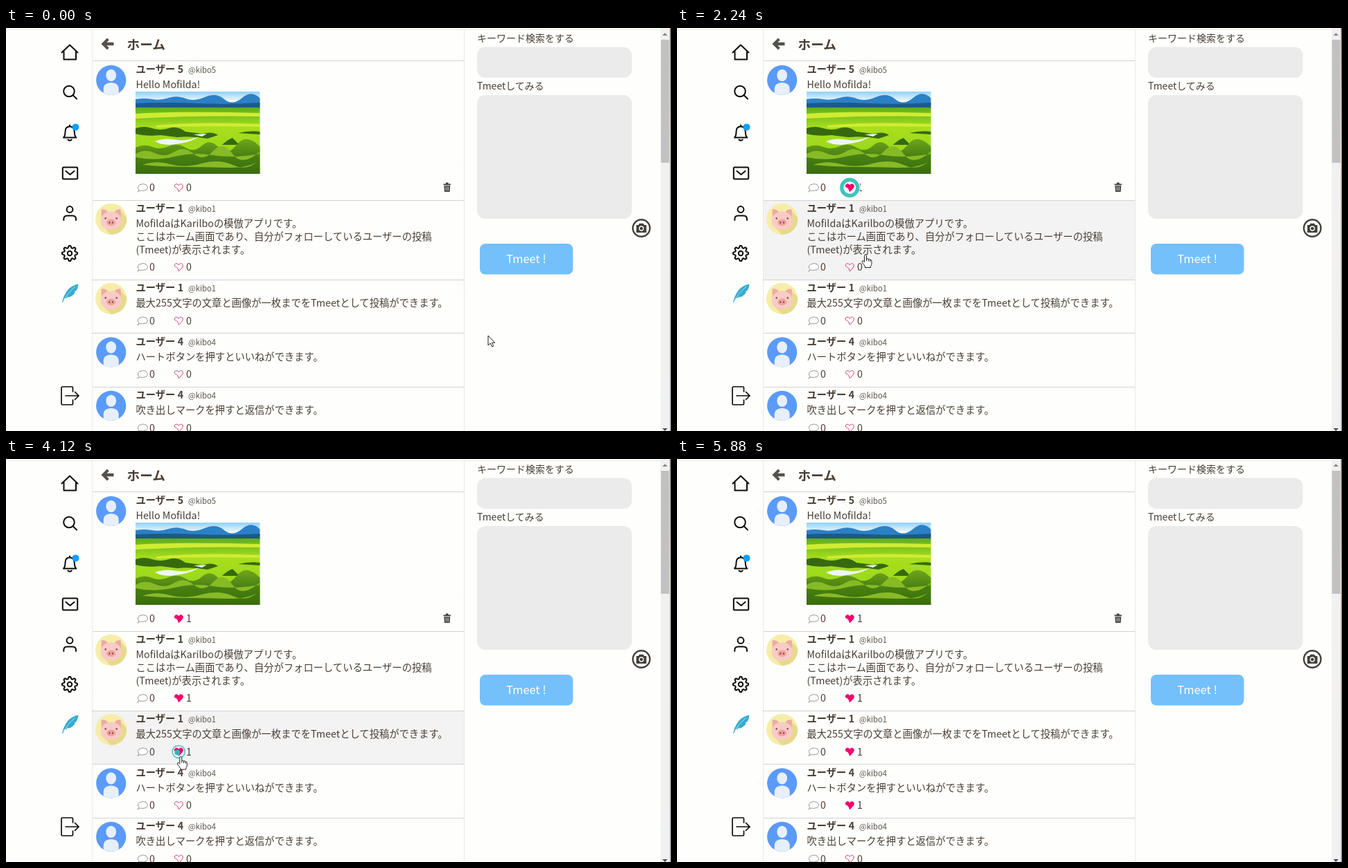
These frames come from a looping animation (960 px wide and 583 px high, 6 s). An HTML page:

```html
<!DOCTYPE html>
<html lang="ja">
<head>
<meta charset="utf-8">
<title>ホーム</title>
<style>
html, body { margin: 0; width: 100%; height: 100%; overflow: hidden; background: #fefefc; }
svg { display: block; width: 960px; height: 583px; }
text { font: 14.3px "Noto Sans CJK JP", "Noto Sans CJK", "Noto Sans", sans-serif; fill: #483e35; white-space: pre; }
.name { font-weight: 700; }
.handle { font-size: 11.3px; fill: #5d544b; }
.title { font-size: 18.7px; font-weight: 700; }
.label { font-size: 14px; }
.button { font-size: 16.5px; fill: #fff; text-anchor: middle; }
.icon { fill: none; stroke: #0b0b0b; stroke-width: 2; stroke-linejoin: round; stroke-linecap: round; }
</style>
</head>
<body>
<svg viewBox="0 0 960 583" xmlns="http://www.w3.org/2000/svg">
  <defs>
    <clipPath id="disc"><circle r="21.6"/></clipPath>
    <clipPath id="pigDisc"><circle r="22.6"/></clipPath>
    <clipPath id="frame"><rect width="179.5" height="119"/></clipPath>
    <linearGradient id="sky" x2="0" y2="1"><stop stop-color="#8fd0f7"/><stop offset="1" stop-color="#f1faff"/></linearGradient>
    <linearGradient id="field" x2="0" y2="1"><stop stop-color="#5fae1c"/><stop offset=".3" stop-color="#a8df1d"/><stop offset="1" stop-color="#8ed01a"/></linearGradient>
    <linearGradient id="scrub" x2="0" y2="1"><stop stop-color="#6fa51b"/><stop offset=".5" stop-color="#487f12"/><stop offset="1" stop-color="#386c0c"/></linearGradient>
    <linearGradient id="edge" x2="0" y2="1"><stop stop-color="#6d5a50"/><stop offset=".3" stop-color="#a08c7c"/><stop offset="1" stop-color="#8b94a0"/></linearGradient>

    <g id="person">
      <circle r="21.6" fill="#5a9af9"/>
      <g clip-path="url(#disc)" fill="#e7effb">
        <ellipse cy="-7" rx="7.4" ry="8.6"/>
        <path d="M-11 20V13C-11 7-7 3.5 0 3.5S11 7 11 13V20Q0 23-11 20Z"/>
      </g>
    </g>
    <g id="pig">
      <circle r="22.6" fill="#f6eda9"/>
      <path clip-path="url(#pigDisc)" fill="#e6da8c" d="M14-11L34 9V34H10L-10 12Z"/>
      <path fill="#efa9a6" d="M-14-2L-14-14Q-7-15-4-9ZM14-2L14-14Q7-15 4-9Z"/>
      <path fill="#f9cbc6" d="M0-11C9-11 15-5 15 3S9 15 0 15-15 11-15 3-9-11 0-11Z"/>
      <ellipse cy="5" rx="6.5" ry="4.8" fill="#f0a19f"/>
      <g fill="#87504f"><circle cx="-8" cy="-1" r="1.3"/><circle cx="8" cy="-1" r="1.3"/>
      <ellipse cx="-2.3" cy="5" rx="1" ry="1.7"/><ellipse cx="2.3" cy="5" rx="1" ry="1.7"/></g>
    </g>
    <path id="bubble" fill="#fefefe" stroke="#8c8c8c" stroke-width=".9" d="M-5 3.5Q-8-.2-5.8-2.4Q-5-5-2-4.6Q0-6.4 2.5-5Q6-5.4 6.4-2.4Q8.8-.4 6.6 1.8Q6 4.5 3 3.8Q.5 5.3-1.8 4Q-3.2 4.8-4.5 4.2L-7.2 6.2Z"/>
    <path id="heart" d="M0 5.8C-2-3-6 1-6-2.2C-6-4.4-4.5-5.3-3.2-5.3C-1.5-5.3-.5-4.2 0-3C.5-4.2 1.5-5.3 3.2-5.3C4.5-5.3 6-4.4 6-2.2C6 1 2 3.4 0 5.8Z"/>
    <g id="photo" clip-path="url(#frame)">
      <rect width="180" height="14" fill="url(#sky)"/>
      <path fill="#2c80c6" d="M0 11Q12 9 24 11T48 9T72 10T100 8T128 11T154 9T180 10V20H0Z"/>
      <path fill="#1c5a86" d="M0 17Q45 15 90 17T180 16V25H0Z"/>
      <rect y="23" width="180" height="97" fill="url(#field)"/>
      <path fill="#d0ec34" d="M0 32Q70 28 180 31V36Q90 34 0 39ZM30 49Q100 43 180 47V51Q90 49 30 52Z"/>
      <path fill="#36690f" d="M0 53Q12 49 24 53T48 53T72 58L96 61Q112 57 119 63L104 68Q80 64 60 66L36 63Q15 65 0 61ZM125 77Q132 70 140 67Q146 73 150 77ZM148 60Q165 56 180 58V62Z"/>
      <path fill="#eef6f4" d="M28 72Q42 66 61 70Q73 72 92 65Q80 73 64 75Q42 80 28 72ZM84 62L103 61 96 65Z"/>
      <path fill="url(#scrub)" d="M0 81Q12 75 24 80T48 79T72 81T96 78T120 81T146 77T180 80V120H0Z"/>
      <path fill="#86bb25" d="M0 90Q14 82 28 89T56 87T84 90T112 86T140 90T180 86L180 90Q140 97 112 92T56 94T0 95ZM10 106Q30 99 50 105T95 104T140 106T175 102Q160 111 130 110T70 109T10 106Z"/>
    </g>
  </defs>

  <rect width="960" height="583" fill="#fefefc"/>
  <g id="posts"></g>
  <path d="M0 2.5H945" stroke="#eeebe3"/>
  <path d="M124.5 3V583M661.5 3V583" stroke="#d5d5d5" stroke-dasharray="1 1"/>
  <path fill="#55514e" d="M137.5 23L146 14.5 148.8 17.2 145.4 20.8H155.5V25.2H145.4L148.8 28.8 146 31.5Z"/>
  <text class="title" x="174.5" y="31">ホーム</text>

  <g class="icon">
    <path d="M80.5 35.5L92 24.5 103.5 35.5M83.5 34V45.5H101V34"/>
    <circle cx="91" cy="91.5" r="7.8"/><path d="M96.7 97.2L102 102.5"/>
    <path d="M83 158.5Q85.5 156 85.5 150Q85.5 142.5 92 142.5T98.8 150Q98.8 156 101.3 158.5ZM89.5 161.5Q92 164 94.7 161.5M92 140.5V142"/>
    <rect x="81.8" y="201.5" width="21.4" height="17" rx="1.5"/><path d="M86.5 207L92.5 212 98.5 207"/>
    <circle cx="92" cy="262.5" r="4.4"/><path d="M83.3 278V276.5Q83.3 271.5 88.3 271.5H96Q101 271.5 101 276.5V278"/>
    <path id="gear"/><circle cx="92" cy="326" r="3.2"/>
    <path stroke-width="1.7" d="M96.5 526V520.5Q96.5 519 95 519H81.500Q80 519 80 520.500V543.500Q80 545 81.500 545H95Q96.500 545 96.500 543.500V538M86 532H105M99.500 526.500L105 532 99.500 537.500"/>
  </g>
  <circle cx="100.5" cy="143.400" r="5" fill="#11a0f4"/>
  <path fill="#37acd0" d="M81 397Q83 387 89 379Q95 372 104.500 370.500Q104 376 101.500 380L98.500 381.500 100 382.500Q96 388 91 389.500L88 389 88.500 390.500Q86 391 84.500 391L82 397Z"/>
  <path fill="none" stroke="#a6deec" d="M83 394Q89 383 100 374"/>

  <text class="label" x="680" y="19.500">キーワード検索をする</text>
  <rect x="680" y="27.500" width="223.500" height="44.500" rx="12" fill="#ebebeb"/>
  <text class="label" x="680" y="89">Tmeetしてみる</text>
  <rect x="680" y="97" width="223.500" height="179" rx="12" fill="#ebebeb"/>
  <rect x="684" y="312" width="134.500" height="44.500" rx="8" fill="#74c0fb"/>
  <text class="button" x="751" y="339.500">Tmeet !</text>
  <circle cx="917.200" cy="289.500" r="12.300" fill="#fefefc" stroke="#42403c" stroke-width="2.400"/>
  <path fill="#42403c" d="M910 285H913L914.500 282.800H920L921.500 285H924.500V296H910Z"/>
  <circle cx="917.200" cy="290" r="3" fill="#42403c" stroke="#fefefc" stroke-width="1.300"/>

  <rect x="945" width="13" height="583" fill="#f1f1f1"/>
  <rect x="945.500" y="17" width="12" height="178" fill="#c1c1c1"/>
  <path fill="#8a8a8a" d="M947.500 11L951.200 7 955 11Z"/>
  <path fill="#505050" d="M947.500 579L951.200 583 955 579Z"/>
  <rect x="958.500" width="1.500" height="583" fill="url(#edge)"/>

  <g id="cursor" fill="#fff" stroke="#222" stroke-linejoin="round">
    <path id="arrow" d="M0 0V14L3.300 11 5.600 16 7.800 15 5.600 10.300H9.800Z"/>
    <path id="hand" d="M-1.500 1.500Q-1.500 0 0 0T1.500 1.500V6Q3 4.800 4.200 6.400Q6 5.600 6.800 7.200Q9 7 9 9.500V13Q9 15 7.500 16.500V18.500H-.5V17Q-3 13.500-4.500 11Q-5.500 9-4 8.600Q-3 8.500-1.500 10.500ZM1.500 6V9M4.200 6.400V9.500M6.800 7.200V10"/>
  </g>
</svg>
<script>
const LOOP = 6000, STEP = 40, RING_MS = 560;
const byId = id => document.getElementById(id);

const posts = [
  { top: 48, end: 249, user: 5, lines: ['Hello Mofilda!'], liked: 1640, ring: 1960, shade: '#fafafa' },
  { top: 249, end: 364, user: 1, liked: 2800, ring: 3280,
    lines: ['MofildaはKarilboの模倣アプリです。', 'ここはホーム画面であり、自分がフォローしているユーザーの投稿', '(Tmeet)が表示されます。'] },
  { top: 364, end: 441.5, user: 1, lines: ['最大255文字の文章と画像が一枚までをTmeetとして投稿ができます。'], liked: 3760, ring: 4060 },
  { top: 441.5, end: 519, user: 4, lines: ['ハートボタンを押すといいねができます。'], liked: 4640, ring: 5320 },
  { top: 519, end: 596.5, user: 4, lines: ['吹き出しマークを押すと返信ができます。'], liked: Infinity, ring: Infinity }
];

// time, x, y of the pointer tip
const route = [
  [0, 696, 445], [360, 696, 445], [460, 655, 488], [560, 575, 506], [700, 480, 450],
  [840, 394, 383], [960, 365, 354], [1240, 290, 262], [1520, 250, 231], [1920, 250, 231],
  [2240, 272, 328], [2480, 262, 342], [2800, 251, 343], [3080, 251, 343], [3360, 265, 416],
  [3680, 251, 424], [4080, 251, 424], [4360, 260, 470], [4640, 251, 498], [5080, 251, 498],
  [5400, 264, 550], [5640, 272, 590], [6000, 272, 590]
];

function postMarkup({ top, end, user, lines }) {
  const row = end - 18;
  const avatar = user === 1 ? 'pig' : 'person';
  const text = lines.map((line, i) => `<text x="187.500" y="${top + 39.3 + i * 18.6}">${line}</text>`).join('');
  const extras = user === 5 ? `<use href="#photo" x="187" y="92"/>
    <path fill="#3f3b38" d="M631.500 225.500H634.500L635.500 223.500H638L639 225.500H642V227.200H631.500Z"/>
    <path fill="#3f3b38" d="M632.300 228.200H641.200L640.600 237H633Z"/>
    <path stroke="#fff" stroke-width=".7" d="M634.800 229.500V235.500M636.800 229.500V235.500M638.800 229.500V235.500"/>` : '';
  return `<g>
    <rect class="shade" x="125" y="${top}" width="536" height="${end - top}" fill="none"/>
    <path d="M124 ${Math.floor(top) + .5 - (top === 48 ? 1 : 0)}H661" stroke="#d2d2d2"/>
    <use href="#${avatar}" x="151.700" y="${top + 27.4}"/>
    <text class="name" x="187.500" y="${top + 17.3}">ユーザー 5</text>
    <text class="handle" x="263" y="${top + 17.3}">@kibo${user}</text>
    ${text}${extras}
    <use href="#bubble" x="197" y="${row}"/>
    <text x="207" y="${row + 5.3}">0</text>
    <text class="count" x="260" y="${row + 5.3}">0</text>
    <g transform="translate(249.300 ${row})">
      <circle class="halo" r="15.500" fill="#fff"/>
      <use class="heart" href="#heart" stroke-width="1"/>
      <circle class="dot" cx="-2" cy="1" fill="#2db9b4"/>
      <circle class="ring" fill="none" stroke="#3cc4bd"/>
    </g>
  </g>`.replace('ユーザー 5', `ユーザー ${user}`);
}

byId('posts').innerHTML = posts.map(postMarkup).join('');
posts.forEach((post, i) => {
  const group = byId('posts').children[i];
  for (const part of ['shade', 'count', 'halo', 'heart', 'dot', 'ring']) {
    post[part + 'El'] = group.querySelector('.' + part);
  }
});

// Eight-toothed cog outline
byId('gear').setAttribute('d', 'M' + Array.from({ length: 64 }, (_, i) => {
  const a = i * Math.PI / 32, r = 9.6 + 1.5 * Math.tanh(2.5 * Math.cos(8 * a));
  return `${(92 + r * Math.cos(a)).toFixed(2)} ${(326 + r * Math.sin(a)).toFixed(2)}`;
}).join('L') + 'Z');

function pointerAt(t) {
  const i = route.findIndex(stop => stop[0] > t);
  const [t0, x0, y0] = route[i - 1], [t1, x1, y1] = route[i];
  const k = (t - t0) / (t1 - t0);
  return [x0 + (x1 - x0) * k, y0 + (y1 - y0) * k];
}

function set(el, attrs) {
  for (const name in attrs) el.setAttribute(name, attrs[name]);
}

function drawRing(post, p) {
  const active = p >= 0 && p < 1;
  const fade = active ? Math.min(1, (1 - p) * 2.5) : 0;
  set(post.ringEl, { r: 9 + 10 * p * p, 'stroke-width': 5 * Math.sin(Math.PI * p) ** 1.3 + .3, opacity: fade });
  set(post.haloEl, { opacity: p > .25 ? fade : 0 });
  set(post.dotEl, { r: 3 + 8 * p, opacity: active && p < .3 ? 1 : 0 });
}

function render(t) {
  const [x, y] = pointerAt(t);
  const [hx, hy] = pointerAt(Math.max(0, t - STEP));
  const overFeed = x < 661;
  set(byId('cursor'), { transform: `translate(${x.toFixed(1)} ${y.toFixed(1)})` });
  set(byId('arrow'), { visibility: overFeed ? 'hidden' : 'visible' });
  set(byId('hand'), { visibility: overFeed ? 'visible' : 'hidden' });
  for (const post of posts) {
    const hover = hx < 661 && hy >= post.top && hy < Math.min(post.end, 583);
    const liked = t >= post.liked;
    set(post.shadeEl, { fill: hover ? post.shade || '#f3f3f3' : 'none' });
    set(post.heartEl, { fill: liked ? '#f6006c' : 'none', stroke: liked ? '#f6006c' : '#d63c74' });
    post.countEl.textContent = liked ? 1 : 0;
    drawRing(post, (t - post.ring) / RING_MS);
  }
}

const start = performance.now();
function tick() {
  const t = (performance.now() - start) % LOOP;
  render(Math.floor(t / STEP) * STEP);
  requestAnimationFrame(tick);
}
render(0);
requestAnimationFrame(tick);
</script>
</body>
</html>
```
